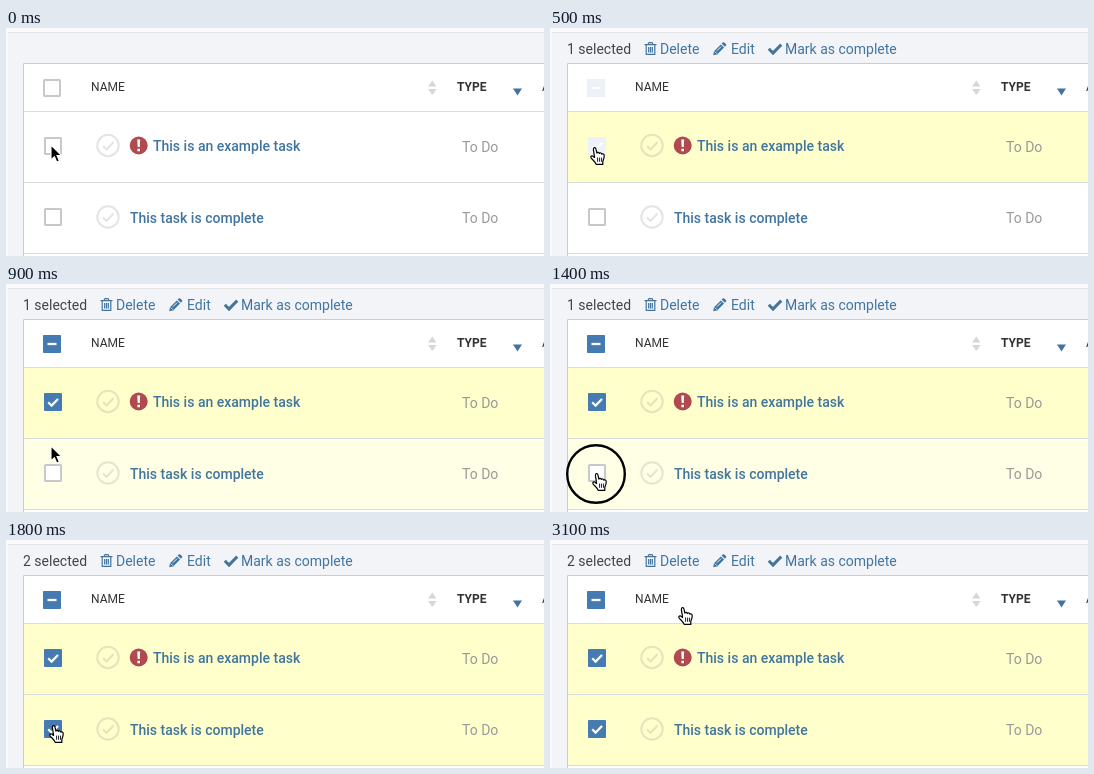
These frames come from a looping animation (538 px wide and 228 px high, 3.7 s). An HTML page:

```html
<!DOCTYPE html>
<html lang="en">
<head>
<meta charset="utf-8">
<title>Selecting tasks</title>
<style>
html, body { margin: 0; width: 100%; height: 100%; overflow: hidden; background: #f2f4f8; }
svg { display: block; width: 538px; height: 228px; font: 14px Roboto, Arial, sans-serif; }
.link { fill: #41759f; }
.task { font-weight: 500; }
.type { fill: #999; }
.head { font-size: 12px; fill: #333; }
.line { stroke: #dadcde; }
.box { fill: #fff; stroke: #c6c8cc; stroke-width: 2; }
.tick { fill: none; stroke: #fff; stroke-width: 2.2; }
.done { fill: none; stroke: #777d88; stroke-width: 2; opacity: .2; }
</style>
</head>
<body>
<svg viewBox="0 0 538 228">
  <defs>
    <g id="done" class="done">
      <circle r="10.7"/>
      <path d="M-5 .5L-1.5 4L5.5 -3.5"/>
    </g>
  </defs>
  <rect width="538" height="228" fill="#f2f4f8"/>
  <rect width="538" height="4" fill="#fafafa"/>
  <path d="M0 4.5H538" stroke="#e3e4e6"/>
  <rect width="1.5" height="228" fill="#fafbfc"/>

  <g id="toolbar">
    <text id="count" x="17" y="26" fill="#444"></text>
    <g class="link">
      <text x="110" y="26">Delete</text>
      <text x="181" y="26">Edit</text>
      <text x="235" y="26">Mark as complete</text>
      <path d="M94.5 16.6H106.5M98 16.2L99 14.6H102L103 16.2M96.2 17V26.4H104.8V17M98.7 19V24.5M100.5 19V24.5M102.3 19V24.5" fill="none" stroke="#41759f" stroke-width="1.2"/>
      <path d="M163.2 27.2L164 23.2L170.8 16.4L174 19.6L167.2 26.4ZM171.6 15.6L172.8 14.4Q173.5 13.8 174.2 14.4L176 16.2Q176.6 16.9 176 17.6L174.8 18.8Z"/>
      <path d="M164.8 23.6L166.8 25.6M167 22.6L171 18.6" stroke="#f2f4f8"/>
      <path d="M218.8 20.8L223 25L231.2 16.6" fill="none" stroke="#41759f" stroke-width="3"/>
    </g>
  </g>

  <rect x="18" y="36" width="520" height="192" fill="#fff"/>
  <rect id="row1" x="18" y="84" width="520" height="70"/>
  <rect id="row2" x="18" y="155" width="520" height="70"/>
  <path d="M538 35.5H17.5V228" fill="none" stroke="#cacccf"/>
  <path class="line" d="M18 154.5H538M18 225.5H538"/>
  <path d="M18 83.5H538" stroke="#d3dfe4"/>

  <text class="head" x="85" y="63">NAME</text>
  <text class="head" x="451" y="63" font-weight="700">TYPE</text>
  <text class="head" x="536" y="63">A</text>
  <path d="M422 58.5L426.3 52.5L430.6 58.5ZM422 61L426.3 67L430.6 61Z" fill="#d6d7da"/>
  <path d="M507 60.5H516L511.5 67.5Z" fill="#41759f"/>

  <use href="#done" x="102" y="117.5"/>
  <use href="#done" x="102" y="189"/>
  <circle cx="132.7" cy="117.5" r="9" fill="#b04a4f"/>
  <path d="M131.2 111.5H134.2L133.7 119H131.7ZM131.4 120.7H134V123.2H131.4Z" fill="#fff"/>
  <text class="link task" x="147" y="123">This is an example task</text>
  <text class="link task" x="124" y="195">This task is complete</text>
  <text class="type" x="456" y="124">To Do</text>
  <text class="type" x="456" y="195">To Do</text>

  <g id="boxes"></g>

  <circle id="ring" r="28.8" fill="none" stroke="#000" stroke-width="2.4"/>
  <path id="arrow" d="M0 0V14.8L3.4 11.6L5.7 17L8.3 15.9L6 10.6H10.6Z" stroke="#fff" stroke-width="1.1"/>
  <g id="hand" fill="#fff" stroke="#000" stroke-width="1.2" stroke-linejoin="round" stroke-linecap="round">
    <path d="M-.4 10.4L-1.6 2.6C-1.8 .2 .6 0 1 2.2L1.9 6.2C2.2 5 4.2 5.2 4.4 6.5C5 5.6 6.7 5.9 6.9 7.1C7.7 6.5 9.2 7 9.2 8.5C9.4 11 8.7 12.6 7.8 14.4V17.4H1.2C.6 15.2 -1.8 13.4 -4 10.8C-4.8 9.3 -3 8.3 -1.8 9.4Z"/>
    <path d="M2.6 11V14.4M4.6 11V14.4M6.6 11V14.4" stroke-width=".9"/>
  </g>
</svg>
<script>
const LOOP = 3700, STEP = 100;
const WHITE = [255, 255, 255], HOVER = [255, 255, 229], SELECTED = [255, 255, 204];
const FIRST_CLICK = 500, SECOND_CLICK = 1500;

// time, x, y of the pointer's hot spot
const path = [
  [0, 45, 117], [200, 45, 117], [300, 45, 119], [600, 45, 119],
  [900, 45, 162], [1200, 47, 189], [1500, 47, 189], [1700, 48, 185],
  [1900, 48, 185], [2400, 133, 67], [LOOP, 133, 67]
];

const $ = id => document.getElementById(id);
const clamp = v => Math.max(0, Math.min(1, v));
const lerp = (a, b, k) => a + (b - a) * k;
const show = (el, on) => el.setAttribute('visibility', on ? 'visible' : 'hidden');
const place = (el, x, y) => el.setAttribute('transform', `translate(${x} ${y})`);
const between = (t, a, b) => t >= a && t < b;

function addBox(x, y, mark) {
  $('boxes').insertAdjacentHTML('beforeend', `<g transform="translate(${x} ${y})">
    <rect class="box" x="1" y="1" width="16" height="16" rx=".6"/>
    <g><rect width="18" height="18" rx="1" fill="#fff"/>
    <rect class="fill" width="18" height="18" rx="1" fill="#457bb0"/>
    <path class="tick" d="${mark}"/></g></g>`);
  const box = $('boxes').lastElementChild;
  return { on: box.querySelector('g'), fill: box.querySelector('.fill') };
}

const tick = 'M4.2 9.2L7.6 12.6L14 6';
const headBox = addBox(37, 51, 'M4.5 9H13.5');
const taskBoxes = [addBox(38, 109, tick), addBox(38, 180, tick)];

function setBox(box, t, start) {
  show(box.on, t >= start);
  const k = clamp((t - start) / 200);
  box.fill.setAttribute('opacity', lerp(.1, 1, k));
}

function setRow(id, t, hoverStart, selectStart) {
  const k = clamp((t - hoverStart + STEP) / 200);
  const color = t >= selectStart ? SELECTED : WHITE.map((c, i) => Math.round(lerp(c, HOVER[i], k)));
  $(id).setAttribute('fill', `rgb(${color})`);
}

function pointerAt(t) {
  const i = path.findIndex(p => p[0] > t);
  const [t0, x0, y0] = path[i - 1], [t1, x1, y1] = path[i];
  const k = (t - t0) / (t1 - t0), e = k * k * (3 - 2 * k);
  return [lerp(x0, x1, e), lerp(y0, y1, e)];
}

function draw(t) {
  const [x, y] = pointerAt(t);
  const isHand = between(t, 300, 700) || between(t, 1100, 2000) || t >= 2300;

  show($('toolbar'), t >= FIRST_CLICK);
  $('count').textContent = (t >= SECOND_CLICK ? 2 : 1) + ' selected';
  setRow('row1', t, 100, FIRST_CLICK);
  setRow('row2', t, 800, SECOND_CLICK);
  setBox(headBox, t, FIRST_CLICK);
  setBox(taskBoxes[0], t, FIRST_CLICK);
  setBox(taskBoxes[1], t, SECOND_CLICK);

  show($('ring'), between(t, 300, FIRST_CLICK) || between(t, 1300, SECOND_CLICK));
  place($('ring'), x - 1, y + 1);
  show($('hand'), isHand);
  show($('arrow'), !isHand);
  place($('hand'), x, y);
  place($('arrow'), x, y);
}

const start = performance.now();
function tickFrame() {
  const t = (performance.now() - start) % LOOP;
  draw(Math.floor(t / STEP) * STEP);
  requestAnimationFrame(tickFrame);
}
tickFrame();
</script>
</body>
</html>
```
